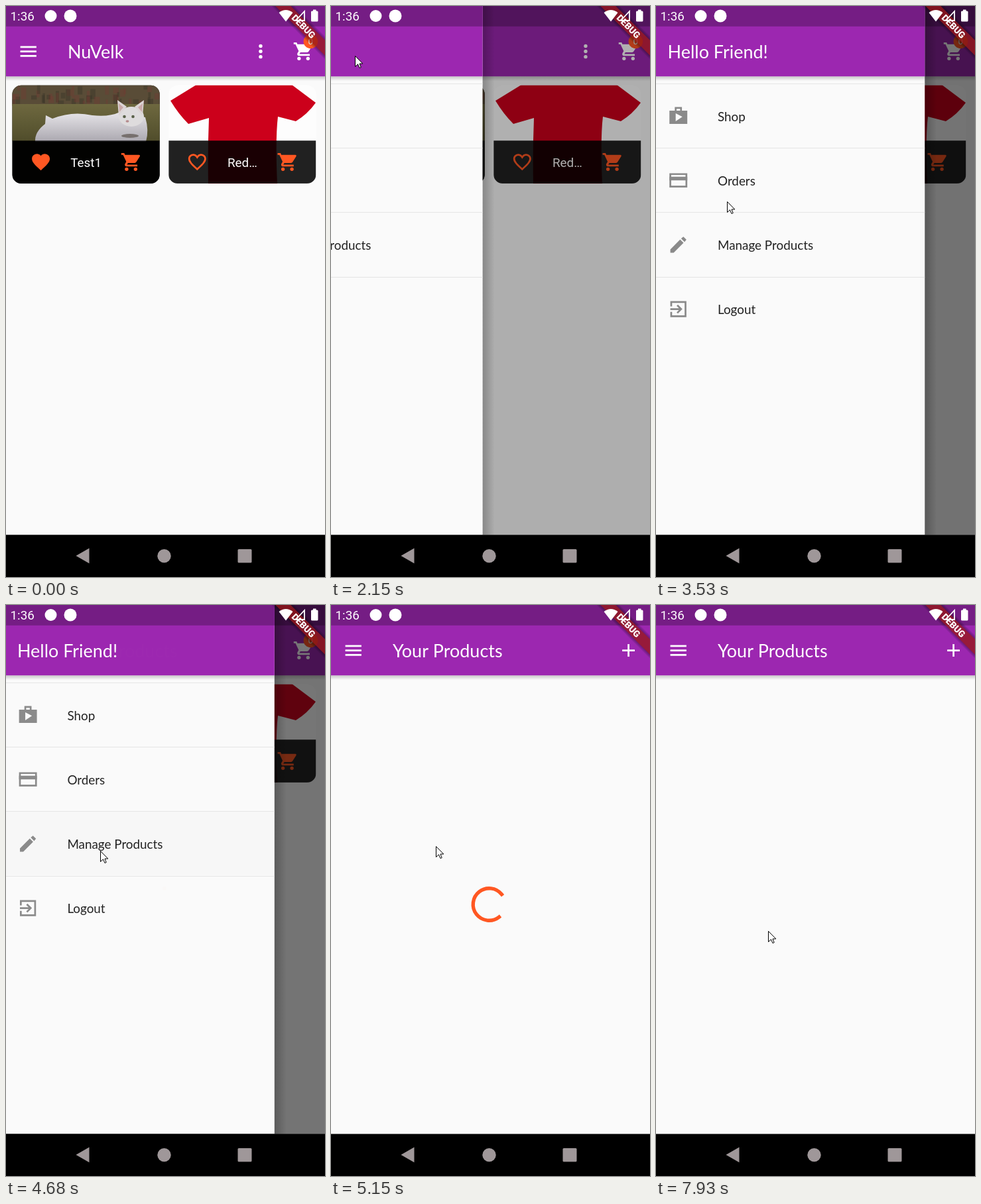
Animation of 481 by 862 pixels, one loop 8 s. Source, as an HTML page with a canvas:

```html
<!DOCTYPE html>
<html lang="en">
<head>
<meta charset="utf-8">
<title>Shop app</title>
<style>
html, body { margin: 0; width: 100%; height: 100%; overflow: hidden; background: #000; }
canvas { display: block; width: 100vw; height: 100vh; }
</style>
</head>
<body>
<canvas id="stage" width="481" height="862"></canvas>
<script>
const W = 481, H = 862, NAV = 798.5;
const DP = 1.347, TAU = Math.PI * 2;
const LOOP = 8000, STEP = 1000 / 13;
const OPEN_AT = 2075, LEAVE_AT = 4690, LOADED_AT = 7000;
const PURPLE = '#9c27b0', ORANGE = '#ff5722', PAPER = '#fafafa';

// Layout in device-independent units
const px = x => x * DP - 4;
const py = y => y * DP - 1.5;
const BAR = py(80), MID = py(52), DRAWER = px(304);

const stage = document.getElementById('stage').getContext('2d');
const layer = document.createElement('canvas');
layer.width = W;
layer.height = H;
const over = layer.getContext('2d');
let c = stage;

// Icons on a 24-unit grid: filled part, then stroked part
const HEART = 'M12 21.35C5.4 15.36 2 12.28 2 8.5 2 3 9 1 12 5.1 15 1 22 3 22 8.5 22 12.28 18.6 15.36 12 21.35z';
const WHEEL = 'a2 2 0 1 0 4 0a2 2 0 1 0-4 0z';
const icons = {
  heart: [HEART, ''],
  cart: [`M5 20${WHEEL}M15 20${WHEEL}M1 2v2h2l3.6 7.6-1.35 2.4C4.5 15.4 5.5 17 7 17h12v-2H7.4l1.1-2H16q1.2 0 1.8-1L21.9 5.4Q22.2 4 21 4H5.2l-.9-2z`, ''],
  menu: ['M3 6h18v2H3zM3 11h18v2H3zM3 16h18v2H3z', ''],
  plus: ['M11 5h2v6h6v2h-6v6h-2v-6H5v-2h6z', ''],
  shop: ['M2 6h20v15H2zM9 18V9l7.5 4z', 'M9 7V3h6v4'],
  card: ['M2 8h20v4H2z', 'M3 5h18v14H3z'],
  edit: ['M3 17.25V21h3.75L17.8 9.9 14 6.2zM21 6.4 17.6 3l-2.5 2.1 3.8 3.8z', ''],
  exit: ['M10 15.6 11.5 17l5-5-5-5L10 8.4 12.7 11H3v2h9.7z', 'M4 9V4h16v16H4v-5']
};
for (const k in icons) icons[k] = icons[k].map(d => new Path2D(d));

const clamp = v => Math.max(0, Math.min(1, v));
const mix = (a, b, p) => a + (b - a) * p;

function seeded(n) {
  return () => (n = n * 16807 % 2147483647) / 2147483647;
}

// Critically damped spring from 0 to 1
function spring(ms) {
  const x = Math.max(0, ms) * 0.024;
  return x > 7 ? 1 : 1 - (1 + x) * Math.exp(-x);
}

// cubic-bezier(.4, 0, .2, 1), solved by bisection
function ease(x) {
  let lo = 0, hi = 1;
  for (let i = 0; i < 18; i++) {
    const s = (lo + hi) / 2, q = 1 - s;
    if (1.2 * q * q * s + 0.6 * q * s * s + s * s * s < clamp(x)) lo = s; else hi = s;
  }
  return lo * lo * (3 - 2 * lo);
}

function rect(x, y, w, h, fill) {
  c.fillStyle = fill;
  c.fillRect(x, y, w, h);
}

function oval(x, y, rx, ry, fill) {
  c.fillStyle = fill;
  c.beginPath();
  c.ellipse(x, y, rx, ry, 0, 0, TAU);
  c.fill();
}

const disc = (x, y, r, fill) => oval(x, y, r, r, fill);

function shape(d, fill) {
  c.fillStyle = fill;
  c.fill(new Path2D(d));
}

function rounded(x, y, w, h, r) {
  c.beginPath();
  c.roundRect(x, y, w, h, r);
}

function text(s, x, y, size, fill, family = 'Lato', align = 'left', weight = 400) {
  c.font = `${weight} ${size}px ${family}, sans-serif`;
  c.textAlign = align;
  c.fillStyle = fill;
  c.fillText(s, x, y);
}

function icon(name, x, y, color, hollow) {
  const [solid, line] = icons[name];
  c.save();
  c.translate(x - 12 * DP, y - 12 * DP);
  c.scale(DP, DP);
  c.fillStyle = c.strokeStyle = color;
  c.lineWidth = hollow ? 4 : 2;
  if (hollow) {
    c.clip(solid);
    c.stroke(solid);
  } else {
    c.fill(solid, 'evenodd');
    c.stroke(line);
  }
  c.restore();
}

function fade(x0, y0, x1, y1, from, to) {
  const g = c.createLinearGradient(x0, y0, x1, y1);
  g.addColorStop(0, from);
  g.addColorStop(1, to);
  return g;
}

function scaffold(w, title, x) {
  rect(0, 0, w, NAV, PAPER);
  rect(0, BAR, w, 7, fade(0, BAR, 0, BAR + 7, 'rgba(0,0,0,.2)', 'rgba(0,0,0,0)'));
  rect(0, 0, w, BAR, PURPLE);
  rect(0, 0, w, py(24), '#751d84');
  text(title, x, 78.8, 20 * DP, '#fff');
}

function cat() {
  const rnd = seeded(7);
  rect(9, 119, 224, 150, '#0c0c08');
  rect(9, 119, 224, 32, '#594c37');
  for (let i = 0; i < 50; i++) {
    rect(9 + rnd() * 222, 117 + rnd() * 26, 3 + rnd() * 6, 6 + rnd() * 12,
      rnd() < 0.5 ? 'rgba(118,56,50,.35)' : 'rgba(50,48,36,.35)');
  }
  rect(9, 148, 224, 56, fade(0, 148, 0, 204, '#6e683f', '#504d2b'));
  const fur = fade(0, 162, 0, 206, '#e4e2e6', '#a9a6ae');
  shape('M44 205Q43 190 59 178L60 165 70 170Q100 158 130 165 155 168 172 160L210 168Q216 188 211 205z', fur);
  oval(189, 167, 19, 15, '#dedcdd');
  for (const side of [-1, 1]) {
    const x = 188 + side * 20;
    shape(`M${x} 142L${x - side * 14} 152 ${x - side * 2} 166z`, '#dcd5d6');
    shape(`M${x - side * 2} 147L${x - side * 9} 153 ${x - side * 3} 160z`, '#c9a9a9');
    disc(185 + side * 6.5, 167, 2.3, '#59614a');
  }
  oval(183, 174, 2.5, 1.8, '#b58a8c');
  oval(187, 196, 13, 3, '#77706e');
}

function shirt() {
  rect(245, 119, 224, 150, '#fdfdfd');
  shape('M287 119H431L467 146Q455 163 437 174L410 167Q406 200 409 269H305Q304 220 306 169L275 178Q260 163 248 143z', '#cc001b');
}

function tile(x, photo, name, liked) {
  const y = py(90), w = 165 * DP, h = 110 * DP, foot = 48 * DP, mid = y + h - foot / 2;
  c.save();
  rounded(x, y, w, h, 10 * DP);
  c.clip();
  photo();
  rect(x, y + h - foot, w, foot, 'rgba(0,0,0,.87)');
  c.restore();
  icon('heart', x + 32 * DP, mid, ORANGE, !liked);
  text(name, x + w / 2, mid + 7, 14 * DP, '#fff', 'Roboto', 'center');
  icon('cart', x + w - 32 * DP, mid, ORANGE);
}

function shopPage() {
  scaffold(W, 'NuVelk', px(72));
  icon('menu', px(28), MID, '#fff');
  for (const dy of [-6, 0, 6]) disc(px(288), MID + dy * DP, 2 * DP, '#fff');
  icon('cart', px(336), MID, '#fff');
  disc(px(344), 53.5, 8 * DP, ORANGE);
  text('0', px(344), 58, 10 * DP, '#fff', 'Roboto', 'center');
  tile(px(10), cat, 'Test1', true);
  tile(px(185), shirt, 'Red…', false);
}

function drawer(open, pressed) {
  if (open <= 0.002) return;
  rect(0, 0, W, NAV, `rgba(0,0,0,${0.54 * open})`);
  c.save();
  c.translate(DRAWER * (open - 1), 0);
  rect(DRAWER, 0, 18, NAV, fade(DRAWER, 0, DRAWER + 18, 0, 'rgba(0,0,0,.22)', 'rgba(0,0,0,0)'));
  c.beginPath();
  c.rect(0, 0, DRAWER, NAV);
  c.clip();
  scaffold(DRAWER, 'Hello Friend!', px(16));
  if (pressed) rect(0, 312, DRAWER, 96, 'rgba(0,0,0,.01)');
  const rows = { shop: 'Shop', card: 'Orders', edit: 'Manage Products', exit: 'Logout' };
  Object.keys(rows).forEach((id, i) => {
    const y = 166 + i * 97.2;
    rect(0, Math.round(y - 49), DRAWER, 1, '#e5e5e5');
    icon(id, px(28), y, '#8a8a8a');
    text(rows[id], px(72), y + 7.5, 14 * DP, '#222');
  });
  c.restore();
}

function spinner(ms) {
  const turn = Math.floor(ms / 1000), f = ms / 1000 - turn;
  const head = ease(f * 2), tail = ease(f * 2 - 1);
  const start = Math.PI * (-0.5 + 1.5 * tail + 1.7 * f - 0.8 * turn);
  c.strokeStyle = ORANGE;
  c.lineWidth = 4 * DP;
  c.lineCap = 'square';
  c.beginPath();
  c.arc(px(180), 452, 18 * DP, start, start + Math.max(0.001, 1.5 * Math.PI * (head - tail)));
  c.stroke();
}

function productsPage(t) {
  scaffold(W, 'Your Products', px(72));
  icon('menu', px(28), MID, '#fff');
  icon('plus', px(336), MID, '#fff');
  if (t < LOADED_AT) spinner(t - LEAVE_AT);
}

function banner() {
  c.save();
  c.translate(W, -1.5);
  c.rotate(Math.PI / 4);
  c.scale(DP, DP);
  for (let i = 0; i < 4; i++) rect(-44, 28 - i, 88, 12 + 2 * i, 'rgba(0,0,0,.11)');
  rect(-44, 28, 88, 12, 'rgba(183,28,28,.627)');
  text('DEBUG', 0, 37.6, 10.2, '#fff', 'Roboto', 'center', 900);
  c.restore();
}

function systemBars() {
  text('1:36', 6.5, 22, 14 * DP, '#fff', 'Roboto');
  disc(67.5, 15, 9, '#fff');
  disc(97, 15, 9.5, '#fff');
  shape('M422 23.5L411.5 10Q422 2 432.5 10z', '#fff');
  c.strokeStyle = '#fff';
  c.lineWidth = 1.8;
  c.stroke(new Path2D('M450 8V22H437z'));
  rounded(460, 7.5, 10.5, 16, 1.5);
  c.fill();
  rect(463, 5.5, 4.5, 3, '#fff');

  const grey = '#9f9799';
  rect(0, NAV, W, H - NAV, '#000');
  shape('M105.5 830l20-11.5v23z', grey);
  disc(238.5, 830.3, 10.2, grey);
  rounded(349.5, 820, 21, 20.5, 1.5);
  c.fill();
}

// Pointer stops: step, x, y; then it circles
const stops = [
  [2, 373, 824], [8, 290, 579], [9, 290, 579], [11, 346, 627], [14, 346, 627],
  [26, 36, 75], [38, 36, 75], [49, 133, 378], [53, 125, 428], [57, 142, 371]
];

function pointerAt(k) {
  const i = stops.findIndex(s => s[0] > k);
  if (i > 0) {
    const [a, x0, y0] = stops[i - 1], [b, x1, y1] = stops[i];
    const p = (k - a) / (b - a);
    return [mix(x0, x1, p), mix(y0, y1, p)];
  }
  const [, x, y] = stops[stops.length - 1];
  const n = k - 79, angle = 0.62 + n * 0.592;
  const size = 0.75 + 0.25 * Math.cos((n + 1) * TAU / 22);
  const join = clamp((k - 66) / 6);
  return [
    mix(x, 199 + 1.8 * n + 125 * size * Math.cos(angle), join),
    mix(y, 357 + 0.8 * n + 165 * size * Math.sin(angle), join)
  ];
}

function cursor(k) {
  if (k < stops[0][0]) return;
  const [x, y] = pointerAt(k);
  const arrow = new Path2D('M0 0V16L4 12.3 6.5 18 8.7 17 6.5 11.5H11.3z');
  c.save();
  c.translate(Math.round(x) + 0.5, Math.round(y) + 0.5);
  c.fillStyle = '#fff';
  c.strokeStyle = '#000';
  c.lineWidth = 1;
  c.fill(arrow);
  c.stroke(arrow);
  c.restore();
}

function draw(now) {
  const k = Math.floor((now % LOOP + 20) / STEP);
  const t = k * STEP;
  const shown = clamp((t - LEAVE_AT) / 300);
  c = stage;
  if (shown < 1) {
    shopPage();
    drawer(spring(t - OPEN_AT) - spring(t - LEAVE_AT), t > LEAVE_AT);
  }
  if (shown > 0) {
    c = over;
    productsPage(t);
    c = stage;
    c.globalAlpha = shown;
    c.drawImage(layer, 0, 0);
    c.globalAlpha = 1;
  }
  banner();
  systemBars();
  cursor(k);
}

const began = performance.now();
function tick() {
  draw(performance.now() - began);
  requestAnimationFrame(tick);
}
tick();
</script>
</body>
</html>
```
